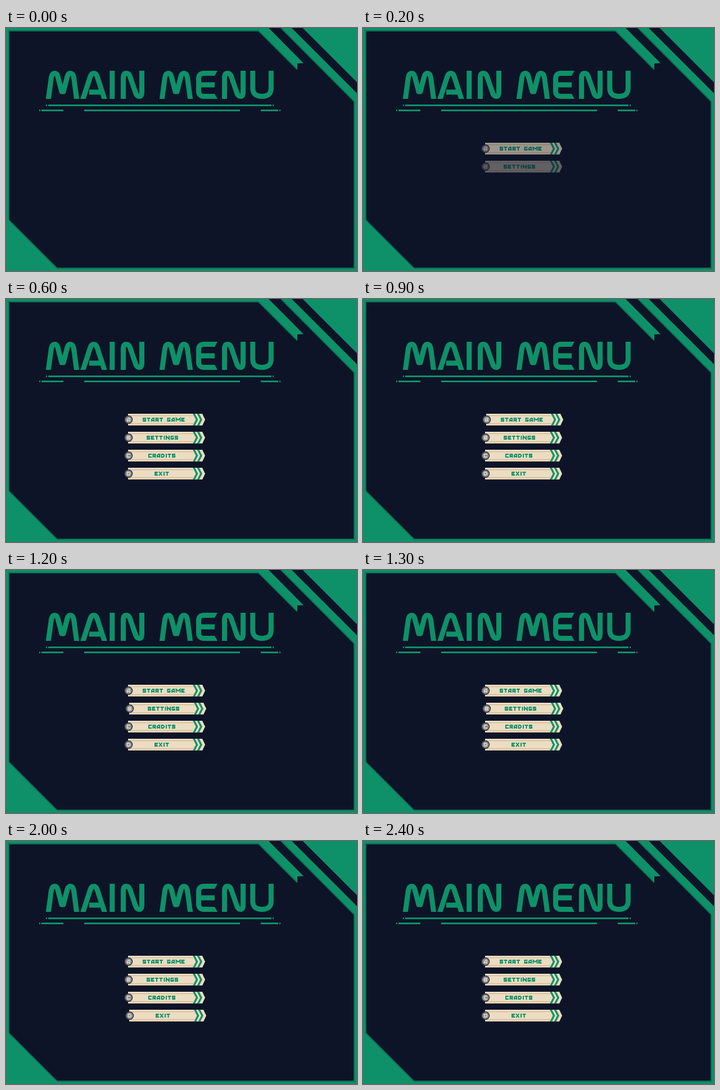
Write an HTML page with a canvas that moves like this. It is 624 px wide and 432 px high and loops after 2700 ms.

```html
<!DOCTYPE html>
<html lang="en">
<head>
<meta charset="utf-8">
<title>Main menu</title>
<style>
html, body { margin: 0; width: 100%; height: 100%; overflow: hidden; background: #0e1428; }
canvas { display: block; }
</style>
</head>
<body>
<canvas id="stage" width="624" height="432" role="img"
  aria-label="MAIN MENU: START GAME, SETTINGS, CRADITS, EXIT"></canvas>
<script>
const W = 624, H = 432, LOOP = 2700, STEP = 100;
const NAVY = '#0e1428', GREEN = '#0e9168', DARK = '#0b7556';
const CREAM = '#ecdcc1', TAN = '#c6b18d';
const ctx = document.getElementById('stage').getContext('2d');

function layer(w, h) {
  const c = document.createElement('canvas');
  c.width = w;
  c.height = h;
  return c;
}

function poly(c, color, ...p) {
  c.fillStyle = color;
  c.beginPath();
  for (let i = 0; i < p.length; i += 2) c.lineTo(p[i], p[i + 1]);
  c.closePath();
  c.fill();
}

function line(c, color, width, d) {
  c.strokeStyle = color;
  c.lineWidth = width;
  c.stroke(new Path2D(d));
}

function disc(c, color, x, y, r) {
  c.fillStyle = color;
  c.beginPath();
  c.arc(x, y, r, 0, Math.PI * 2);
  c.fill();
}

function clipRect(c, x, y, w, h) {
  c.beginPath();
  c.rect(x, y, w, h);
  c.clip();
}

// Squared letters: [advance, path] on a 7 px cap height
const GLYPHS = {
  S: [7.5, 'M6 1H1V3.5H5V6H0'],
  T: [7.5, 'M0 1H6M3 1V7'],
  A: [7.5, 'M1 7V3L3 1H5V7M1 5H5'],
  R: [7.5, 'M1 7V1H5V4H1M3 4L5.5 7'],
  G: [7.5, 'M6 1H1V6H5V4H3'],
  M: [10, 'M1 7V1L4.5 4L8 1V7'],
  E: [7.5, 'M6 1H1V6H6M1 3.5H5'],
  I: [4, 'M1.5 0V7'],
  N: [8.5, 'M1 7V1L6 6V0'],
  C: [7.5, 'M6 1H1V6H6'],
  D: [8, 'M0 1H4L5.5 2.5V4.5L4 6H1V1'],
  X: [8, 'M.5 0L6 7M6 0L.5 7'],
  B: [7.5, 'M1 1H5V6H1V1M1 3.5H5'],
  ' ': [6, '']
};

function label(c, text, x, y, color, weight) {
  c.save();
  c.translate(x, y);
  for (const ch of text) {
    const [advance, d] = GLYPHS[ch];
    line(c, color, weight, d);
    c.translate(advance, 0);
  }
  c.restore();
}

function drawFrame(c) {
  c.fillStyle = NAVY;
  c.fillRect(0, 0, W, H);

  line(c, DARK, 6, 'M451 3H3V429H621V130');
  line(c, GREEN, 3.5, 'M451 1.75H1.75V430.25H622.25V130');

  poly(c, GREEN, 0, 341, 4, 341, 91, 428, 91, H, 0, H);
  line(c, DARK, 1.5, 'M5 341L91 427');

  poly(c, GREEN, 449, 0, 467, 0, 529, 62.5, 518, 63, 518, 74, 449, 5);
  line(c, DARK, 2, 'M449 5L517.5 73.5');

  poly(c, GREEN, 489, 0, 508, 0, W, 116, W, 134, 618, 130);
  line(c, DARK, 2, 'M489 0L619 130.5');

  poly(c, GREEN, 527.5, 0, W, 0, W, 96.5);
}

function drawTitle(c) {
  const M = 'M75 129L80.5 88Q82 80.5 86.5 80.5Q90.5 80.5 92 86L99 113H102' +
    'L109 86Q110.5 80.5 114.5 80.5Q119 80.5 120.5 88L126 129';
  const N = 'M208.5 126V89Q208.5 80.5 214 80.5Q218 80.5 220 85L231 117' +
    'Q233 121.5 237 121.5Q241.5 121.5 241.5 113V76';
  const draw = (d, dx = 0) => {
    c.save();
    c.translate(dx, 0);
    line(c, GREEN, 9, d);
    c.restore();
  };
  c.save();
  clipRect(c, 60, 75.5, 430, 50.5);
  c.lineJoin = 'round';
  draw(M);
  draw('M136 129L150 86Q152 80.5 156 80.5Q160 80.5 162 86L176 129M148 114H169');
  draw('M188.8 76V126');
  draw(N);
  draw(M, 202);
  draw('M371 80.5H352Q342.5 80.5 342.5 90V112Q342.5 121.5 352 121.5H371M342 101H371');
  poly(c, GREEN, 370, 76, 376, 76, 371, 85, 370, 85);
  poly(c, GREEN, 370, 117, 371, 117, 376, 126, 370, 126);
  draw(N, 180);
  draw('M438.7 76V107Q438.7 121.5 455 121.5Q471.3 121.5 471.3 107V76');
  c.restore();

  line(c, GREEN, 3, 'M71 137.5H73M75 137.5H472M474 137.5H476');
  line(c, GREEN, 3, 'M59 146.5H61M63 146.5H102M139 146.5H416M453 146.5H484M486 146.5H488');
}

const ITEMS = [
  ['START GAME', 243],
  ['SETTINGS', 250],
  ['CRADITS', 253],
  ['EXIT', 264]
];
const LEFT = 210, TOP = 204, GAP = 32;

function makeButton([text, x], i) {
  const b = layer(146, 22), c = b.getContext('2d');
  c.translate(-LEFT, 0);
  poly(c, CREAM, 217, 0, 349, 0, 354, 10.5, 349, 21, 217, 21);
  line(c, TAN, 1, 'M217 3.5H333M217 17.5H333M217 20.5H349');
  c.save();
  clipRect(c, LEFT, 0, 146, 21);
  for (const cx of [333.5, 341]) {
    line(c, GREEN, 3.4, `M${cx} -1L${cx + 6} 10.5L${cx} 22`);
  }
  c.restore();
  label(c, text, x, 7, GREEN, 2);
  disc(c, '#343f4d', 217.8, 10.5, 7.5);
  disc(c, '#8d8f90', 217.8, 10.5, 5.8);
  label(c, 'ABCD'[i], 214.8, 7, CREAM, 1.4);
  return b;
}

const backdrop = layer(W, H);
drawFrame(backdrop.getContext('2d'));
drawTitle(backdrop.getContext('2d'));
const buttons = ITEMS.map(makeButton);
const FADE = [0.38, 0.65, 1];

// Buttons fade in one after another, then each is nudged right in turn
function render(now) {
  const step = Math.floor((now % LOOP) / STEP);
  ctx.drawImage(backdrop, 0, 0);
  buttons.forEach((b, i) => {
    const age = step - 1 - i;
    if (age < 0) return;
    const focus = step - 8 - 4 * i;
    const nudge = focus >= 0 && focus < 4 ? 2 : 0;
    ctx.globalAlpha = FADE[Math.min(age, 2)];
    ctx.drawImage(b, LEFT + nudge, TOP + GAP * i);
    ctx.globalAlpha = 1;
  });
}

const start = performance.now();
function tick() {
  render(performance.now() - start);
  requestAnimationFrame(tick);
}
tick();
</script>
</body>
</html>
```
